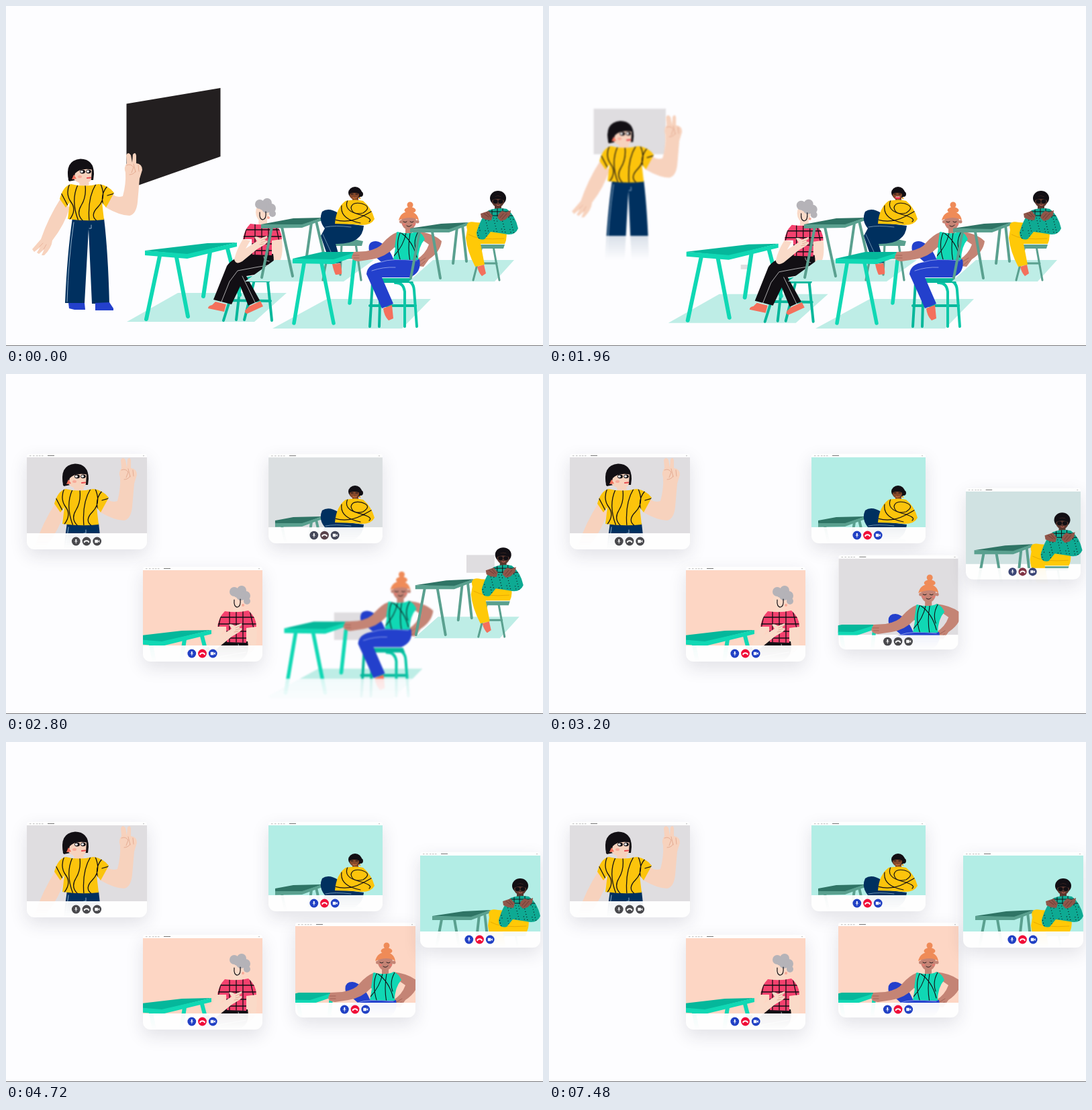
An HTML page with a canvas that plays this animation: 800x506 px, repeating every 8 s.

```html
<!DOCTYPE html>
<html lang="en">
<head>
<meta charset="utf-8">
<title>Classroom to video call</title>
<style>
html, body { margin: 0; width: 100%; height: 100%; overflow: hidden; background: #fdfdff; }
canvas { display: block; width: 800px; height: 506px; }
</style>
</head>
<body>
<canvas id="stage" width="800" height="506"></canvas>
<script>
const W = 800, H = 506, LOOP = 8000, MOVE = 737;
const stage = document.getElementById('stage').getContext('2d');
const layer = Object.assign(document.createElement('canvas'), { width: W, height: H });
const layerCtx = layer.getContext('2d');
let g = stage;

const INK = '#120f14', SALMON = '#f4705c', NAVY = '#00305f', BLUE = '#2340cc', YELLOW = '#fcc40c';
const TEAL = '#10d8b4', DEEP = '#05b79b', PINE = '#2f7465', SAGE = '#5aa08f', FLOOR = '#beede6';
const GRAY = [223, 221, 224], PEACH = [253, 214, 196], MINT = [178, 237, 229];

const clamp = v => Math.max(0, Math.min(1, v));
const lerp = (a, b, k) => a + (b - a) * k;
const ease = k => (1 - Math.cos(Math.PI * clamp(k))) / 2;
const mix = (a, b, k) => `rgb(${a.map((v, i) => Math.round(lerp(v, b[i], k)))})`;

const cache = {};
const path = d => cache[d] || (cache[d] = new Path2D(d));
function fill(color, d) { g.fillStyle = color; g.fill(path(d)); }
function line(color, width, d) {
  g.strokeStyle = color;
  g.lineWidth = width;
  g.lineCap = g.lineJoin = 'round';
  g.stroke(path(d));
}
function oval(color, x, y, rx, ry = rx) {
  g.fillStyle = color;
  g.beginPath();
  g.ellipse(x, y, rx, ry, 0, 0, 7);
  g.fill();
}
function inside(d, draw) { g.save(); g.clip(path(d)); draw(); g.restore(); }

function drawBoard() { fill('#231f20', 'M179.5 145.5L319.5 122V224L179.5 273Z'); }

function drawTeacher() {
  const skin = '#f7d2bd', crease = '#e3a78e';
  fill(skin, 'M81 287L95 300Q87 326 69 349Q68 360 57 371L53 371L57 362L49 369L46 367L51 359L42 366L39 362L52 347Q63 315 81 287Z');
  line(crease, .7, 'M50 358L55 353M56 362L60 355');
  fill(skin, 'M158 279Q164 286 174 283Q179 265 178 248Q175 240 180 234L179 222Q182 216 186 222L188 233L189 221Q193 216 194 223L194 234Q203 235 203 244L199 257L196 292Q194 310 184 312Q170 312 149 300Z');
  line(crease, .9, 'M180 237Q186 234 190 240L187 248M190 235L193 247M197 237L198 246M184 251Q190 251 193 246');
  fill(NAVY, 'M99 315L146 316Q152 365 154 443H128L123 332L117 442H88Q91 370 99 315Z');
  line('#b9d1e5', .8, 'M101 322Q93 375 91 440M127 326V331H124');
  fill(BLUE, 'M93 442H117L118 452H102L94 450ZM133 442L154 441L160 450V453H133Z');
  fill(skin, 'M111 254H121L124 266Q115 270 109 266Z');
  const shirt = 'M97 265Q116 270 138 265Q153 267 161 278L149 300L143 292L146 318Q120 321 92 317L95 292L89 300L80 287Q85 268 97 265Z';
  fill(YELLOW, shirt);
  inside(shirt, () => line(INK, 1.3, 'M95 264Q88 280 97 292T94 319M107 266Q96 290 108 320M118 267Q120 284 112 297T115 320M134 265Q121 286 124 320M141 265Q150 286 137 299T136 320M151 268Q139 282 146 300M82 278L92 297M151 282L161 279'));
  fill(INK, 'M94 261Q86 230 111 227.5Q131 228 131 250L130 259L104 259Z');
  fill(skin, 'M99 247Q110 240 128 242.5L127 258Q124 265 114 264.5Q103 263 99 254Z');
  fill(INK, 'M93 260L92 248Q95 233 110 232Q128 231 130 244Q112 240 103 249L101 257Z');
  oval(INK, 114, 246.5, 4, 2.9); oval(INK, 123, 246.3, 3.8, 2.9);
  oval('#fff', 112.8, 246.5, 2, 1.8); oval('#fff', 122, 246.3, 1.9, 1.8);
  line('#e74b50', 2.2, 'M121 256L126 255.5');
  fill(SALMON, 'M101 251L105 257L98 258Z');
  oval('#f8aa99', 110, 254, 3, 2);
}

function drawGrayHaired() {
  const skin = '#fadac8', crease = '#dba08a';
  fill(FLOOR, 'M256 427H418L370 470H180Z');
  line(DEEP, 4, 'M338 423L324 468M349 415L343 467M369 412L355 467M390 410L396 468M333 438L394 439');
  line(TEAL, 6, 'M229 372L209 466M254 374L271 462M304 366L294 432M330 361L348 430');
  fill(DEEP, 'M207 364L300 353L344 352L270 370Z');
  fill(TEAL, 'M207 364L270 369L344 352V358L270 376L207 371Z');
  fill(DEEP, 'M356 404Q376 398 396 405L393 411H360Z');
  fill(skin, 'M396 347L411 347Q414 374 405 384L394 391L391 374Z');
  fill(INK, 'M366 367L398 369Q402 391 387 397L358 402L378 438L361 446L349 417L336 444L309 437L329 387Q337 374 366 367Z');
  line('#eee', .7, 'M395 385Q370 389 345 394L333 410L321 440M352 402L371 441M384 373Q384 379 392 380');
  fill(SALMON, 'M312 440L328 444L325 455L301 450Q301 446 307 445ZM362 447L379 439L383 447L359 458Q354 456 357 452Z');
  fill(skin, 'M377 312H389V325Q384 329 376 325Z');
  const shirt = 'M364 324Q383 327 399 323Q411 333 411 347L396 349V371L367 370L366 347L353 347Q355 333 364 324Z';
  fill('#f4416e', shirt);
  inside(shirt, () => line(INK, 1.3, 'M350 333H412M350 343H412M350 354H412M350 364H412M360 321L354 350M371 322V373M381 324V373M391 322V373M401 322L407 350'));
  fill(skin, 'M353 347L364 349L357 361L374 350L370 344Q374 342 379 346L389 342Q391 344 385 348L390 350Q388 354 384 356L374 362L352 380Q342 386 340 377Q344 361 353 347Z');
  line(crease, .8, 'M380 349L388 345M380 352L387 350M378 355L384 354');
  oval(skin, 382, 307, 10, 13);
  [[378, 295, 7], [389, 293, 7], [395, 301, 7], [388, 301, 7], [397, 309, 5], [383, 298, 6]].forEach(c => oval('#b5b3b8', ...c));
  line(INK, 1.2, 'M378 307Q377 318 383 318Q388 317 387 306');
  oval('#f7aa98', 391, 315, 2);
}

function drawNavyLegs(t) {
  const skin = '#85482a';
  fill(FLOOR, 'M400 378H548L503 410H356Z');
  line(SAGE, 3.2, 'M481 360L472 408M500 354L498 400M521 354L529 408M478 375H524');
  line(SAGE, 4, 'M396 329L381 404M411 329L427 402M455 323L448 372M462 320L474 372');
  fill(PINE, 'M380 325L428 316L471 315L441 326Z');
  fill(SAGE, 'M380 325L441 325L471 315V319L441 330L380 331Z');
  fill(SAGE, 'M488 350Q512 344 532 350L530 357H491Z');
  fill(NAVY, 'M496 309Q481 299 471 306Q465 319 475 331L469 342Q475 362 484 384L499 382L491 354Q531 355 533 327L492 322Z');
  line('#9cb6cf', .7, 'M476 329Q490 326 514 329M472 340L491 381');
  fill(SALMON, 'M486 384L498 383Q501 394 500 399L491 400Q488 394 486 384Z');
  fill(skin, 'M516 282H525V292H516Z');
  const shirt = 'M506 290Q521 287 532 290Q545 301 549 317Q543 329 519 325L490 324Q492 300 506 290Z';
  fill(YELLOW, shirt);
  inside(shirt, () => line(INK, 1.2, 'M490 318Q510 324 531 313T546 303M500 297Q497 317 528 323M509 289Q502 304 525 310T541 321M514 300Q516 291 530 294Q546 299 532 308Q516 312 514 300'));
  oval(INK, 520, 278, 10, 9);
  oval(INK, 528, 280, 4);
  oval(skin, 519, 281, 7, 7);
  fill(INK, 'M511 277Q519 270 530 276L528 280Q518 276 511 280Z');
  line(INK, 1, 'M514 280H517M521 280H524');
  const talking = t > 960 && t < 2600;
  line(talking ? '#f2304d' : '#c96d37', talking ? 3 : 1.4, 'M517 285Q519 287 522 285');
  if (talking) line('#fff', .9, 'M517 284H522');
  oval('#f6a321', 527, 286, 1.3);
}

function drawBunHaired() {
  const skin = '#c48475', crease = '#9b5a4f';
  fill(FLOOR, 'M478 436H633L590 480H397Z');
  line(TEAL, 5.5, 'M444 383L429 472M470 382L488 472M519 378L512 442');
  fill(DEEP, 'M427 376L471 366L523 366L488 379Z');
  fill(TEAL, 'M427 376L488 377L523 366V372L488 384L427 383Z');
  line(DEEP, 4, 'M546 411L542 477M558 409L556 477M542 446H610');
  line('#0ac7a7', 4, 'M560 408H590Q607 407 608 423L612 477M580 412Q592 411 594 425V477');
  fill(DEEP, 'M550 405H604L607 412H548Z');
  fill(skin, 'M611 335Q637 338 649 350Q647 366 630 377L622 388L613 387L612 377Q625 369 630 355L620 348Z');
  line(crease, .8, 'M615 381L625 375M617 386L624 380');
  fill(BLUE, 'M577 376L616 377Q620 397 601 404L560 404L577 443L560 450L537 399Q538 384 559 381L541 365Q538 350 551 350Q567 352 577 376Z');
  line('#b6c2f4', .7, 'M559 381Q574 375 612 379M545 394Q562 388 580 389');
  fill(SALMON, 'M562 450L575 445L577 465L570 468Q563 461 562 450Z');
  fill(skin, 'M595 326H605V338H595Z');
  const shirt = 'M583 336Q600 341 613 335Q620 338 624 347Q614 358 614 378L577 377L580 360L572 353Q576 341 583 336Z';
  fill(TEAL, shirt);
  inside(shirt, () => line(INK, 1.1, 'M588 336Q579 353 588 380M596 338Q592 357 578 372M602 338Q598 360 602 380M589 338Q606 350 612 374M614 336Q606 350 611 364'));
  fill(skin, 'M582 337L579 359Q565 374 545 377L525 380Q515 379 515 373L518 366L536 365Q555 362 562 352Q573 340 582 337Z');
  line(crease, .8, 'M517 371H526M518 375H526');
  oval(skin, 600, 320, 11, 13);
  oval(skin, 588.5, 321, 2.5); oval(skin, 613, 321, 2.5);
  const hair = '#ef8b58';
  oval(hair, 602, 296, 4.5); oval(hair, 602, 304, 8.5, 4.7);
  fill(hair, 'M585 319Q588 306 601 306Q613 307 615 319Q603 311 585 319Z');
  line(INK, .9, 'M592 321Q595 323 597 321M602 321Q605 323 607 321M597 327Q601 330 604 326');
  oval('#e77870', 593, 325, 2, 1.4); oval('#e77870', 608, 325, 2, 1.4);
}

function drawDotted() {
  const skin = '#5b372e', hand = '#90564a';
  fill(FLOOR, 'M636 378H757L728 410H600Z');
  line(SAGE, 3, 'M709 358L696 408M726 358L735 408M702 383H731');
  line(SAGE, 4, 'M616 336L603 405M635 336L647 405M672 329L666 383M680 326L686 380');
  fill(PINE, 'M602 331L648 324L689 322L660 333Z');
  fill(SAGE, 'M602 331L660 332L689 322V326L660 337L602 337Z');
  fill(SAGE, 'M698 355H743L741 361H701Z');
  fill('#ffc907', 'M700 322Q683 318 687 333L685 345Q687 365 699 388L713 385L707 354H743Q748 345 744 325Z');
  line('#df9e00', .7, 'M689 340Q704 349 742 346');
  fill(SALMON, 'M702 388L712 385L715 398L709 402Q704 397 702 388Z');
  fill(skin, 'M728 294H738V304H728Z');
  const shirt = 'M719 304Q732 299 746 302Q759 312 763 331Q758 343 742 339L722 336L713 347Q701 350 701 337Q708 313 719 304Z';
  fill('#0eaa93', shirt);
  inside(shirt, () => {
    for (let i = 0; i < 60; i++) oval(INK, 701 + i * 37.3 % 62, 314 + i * 17.9 % 35, .65);
    line(INK, 1, 'M717 306H760M714 312H760M724 301V313M732 300V313M740 300V313M749 302V315');
  });
  fill(hand, 'M707 309L713 307L719 305L725 312L723 319L715 318L708 315ZM734 309L739 305L745 307L752 304L751 311L744 318L737 320L732 315Z');
  line('#5b302a', .7, 'M712 309L719 314M716 307L722 314M741 309L736 315M746 309L739 317');
  oval(INK, 733, 286, 12, 11);
  oval(skin, 733, 291, 9, 8.5);
  fill(INK, 'M722 287Q732 279 744 287L741 289Q733 285 724 289Z');
  oval(INK, 729, 291, 3.6, 3); oval(INK, 737, 291, 3.6, 3);
  line('#d66b5d', 1, 'M731 296Q733 298 736 296');
}

// box: left, top, right, bottom of the call window; from: centre it grows out of
const groups = [
  { draw: drawTeacher, start: 1545, shift: [-8, -94], box: [31, 119, 210, 261], bar: 237, from: [120, 196], low: 500, buttons: 120 },
  { draw: drawGrayHaired, start: 1844, shift: [-38, 29], box: [204, 287, 382, 428], bar: 404, from: [291, 391], low: 480, buttons: 292.5, clipLeft: 204, tint: PEACH, tintAt: 2420 },
  { draw: drawNavyLegs, start: 2078, shift: [0, -103], box: [391, 119, 561, 252], bar: 228, from: [475, 300], low: 435, buttons: 474.5, clipLeft: 401, tint: MINT, tintAt: 2780 },
  { draw: drawBunHaired, start: 2500, shift: [-35, 7], box: [431, 269, 610, 410], bar: 388, from: [521, 400], low: 490, buttons: 520, clipLeft: 431, clipRight: 610, tint: PEACH, tintAt: 3220 },
  { draw: drawDotted, start: 2564, shift: [33, -72], box: [617, 164, 796, 306], bar: 282, from: [707, 300], low: 435, buttons: 705.5, tint: MINT, tintAt: 3130 },
];

function motionBlur(p) {
  const radius = 1.1 * Math.sin(Math.PI * p);
  return radius > .2 ? `blur(${radius.toFixed(2)}px)` : 'none';
}

function place({ box: [l, t, r, b], from }, p) {
  const cx = (l + r) / 2, cy = (t + b) / 2;
  g.translate(lerp(from[0], cx, p), lerp(from[1], cy, p));
  g.scale(p, p);
  g.translate(-cx, -cy);
}

function drawCard(group, p, tint) {
  const [l, t, r, b] = group.box;
  const shown = clamp((p - .6) / .35);
  g.save();
  place(group, p);
  g.filter = motionBlur(p);
  g.globalAlpha = shown;
  g.shadowColor = 'rgba(40,40,60,.13)';
  g.shadowBlur = 26;
  g.shadowOffsetY = 9;
  g.fillStyle = '#fefefe';
  g.beginPath();
  g.roundRect(l, t, r - l, b - t, [3, 3, 11, 11]);
  g.fill();
  g.shadowColor = 'transparent';
  g.globalAlpha = 1;
  g.fillStyle = mix(GRAY, group.tint || GRAY, tint);
  g.fillRect(l, t + 5, r - l, group.bar - t - 5);
  g.globalAlpha = shown;
  g.fillStyle = '#bbb';
  [4, 9, 14, 18, 22].forEach(x => g.fillRect(l + x, t + 2.2, 2.5, 1));
  g.fillRect(r - 6, t + 2.2, 2, 1);
  g.fillStyle = '#777';
  g.fillRect(l + 31, t + 2, 10, 1);
  g.restore();
}

function drawButtons(group, p, tint) {
  const y = group.box[3] - 12, x = group.buttons, colored = group.tint ? tint : 0;
  const dark = [72, 72, 76];
  g.save();
  place(group, p);
  g.globalAlpha = clamp((p - .75) / .15);
  [-15.7, 0, 15.7].forEach((dx, i) => oval(mix(dark, i === 1 ? [240, 14, 56] : [32, 64, 196], colored), x + dx, y, 6.4));
  g.translate(x - 15.7, y);
  line('#fff', 1.9, 'M0 -2.4V0');
  line('#fff', .7, 'M-2 0Q0 3 2 0M0 1.8V3.2');
  g.translate(15.7, 0);
  line('#fff', 1.9, 'M-3.2 1.3V.4Q0 -2 3.2 .4V1.3');
  g.translate(15.7, 0);
  fill('#fff', 'M-3.4 -2.2H1.2V2.2H-3.4ZM1.6 -.5L3.6 -2V2L1.6 .5Z');
  g.restore();
}

function drawContent(group, p, t) {
  const { clipLeft: left = -60, clipRight: right = W + 60, shift } = group;
  const x0 = lerp(left - 60, left, p), x1 = lerp(right + 60, right, p);
  const limit = lerp(group.low, group.bar, p);
  const fade = lerp(54, group.box[3] - group.bar, p);
  g = layerCtx;
  g.clearRect(0, 0, W, H);
  g.save();
  g.beginPath();
  g.rect(x0, 0, x1 - x0, p > 0 ? limit + fade : H);
  g.clip();
  g.translate(shift[0] * p, shift[1] * p);
  group.draw(t);
  g.restore();
  if (p > 0) {
    // the part below the limit dissolves downwards
    const veil = g.createLinearGradient(0, limit, 0, limit + fade);
    veil.addColorStop(0, `rgba(0,0,0,${lerp(.75, .94, p)})`);
    veil.addColorStop(1, '#000');
    g.globalCompositeOperation = 'destination-out';
    g.fillStyle = veil;
    g.fillRect(0, limit, W, fade + 1);
    g.globalCompositeOperation = 'source-over';
  }
  g = stage;
  g.filter = motionBlur(p);
  g.drawImage(layer, 0, 0);
  g.filter = 'none';
}

function render(t) {
  g = stage;
  g.fillStyle = '#fdfdff';
  g.fillRect(0, 0, W, H);
  groups.forEach((group, i) => {
    const p = ease((t - group.start) / MOVE);
    const tint = clamp((t - (group.tintAt || 0)) / 210);
    if (i === 0) {
      g.globalAlpha = clamp(1 - p / .45);
      drawBoard();
      g.globalAlpha = 1;
    }
    if (p > 0) drawCard(group, p, tint);
    drawContent(group, p, t);
    if (p > .75) drawButtons(group, p, tint);
  });
  g.fillStyle = '#77777a';
  g.fillRect(0, 505, W, 1);
}

const begin = performance.now();
function tick() {
  render((performance.now() - begin) % LOOP);
  requestAnimationFrame(tick);
}
tick();
</script>
</body>
</html>
```
